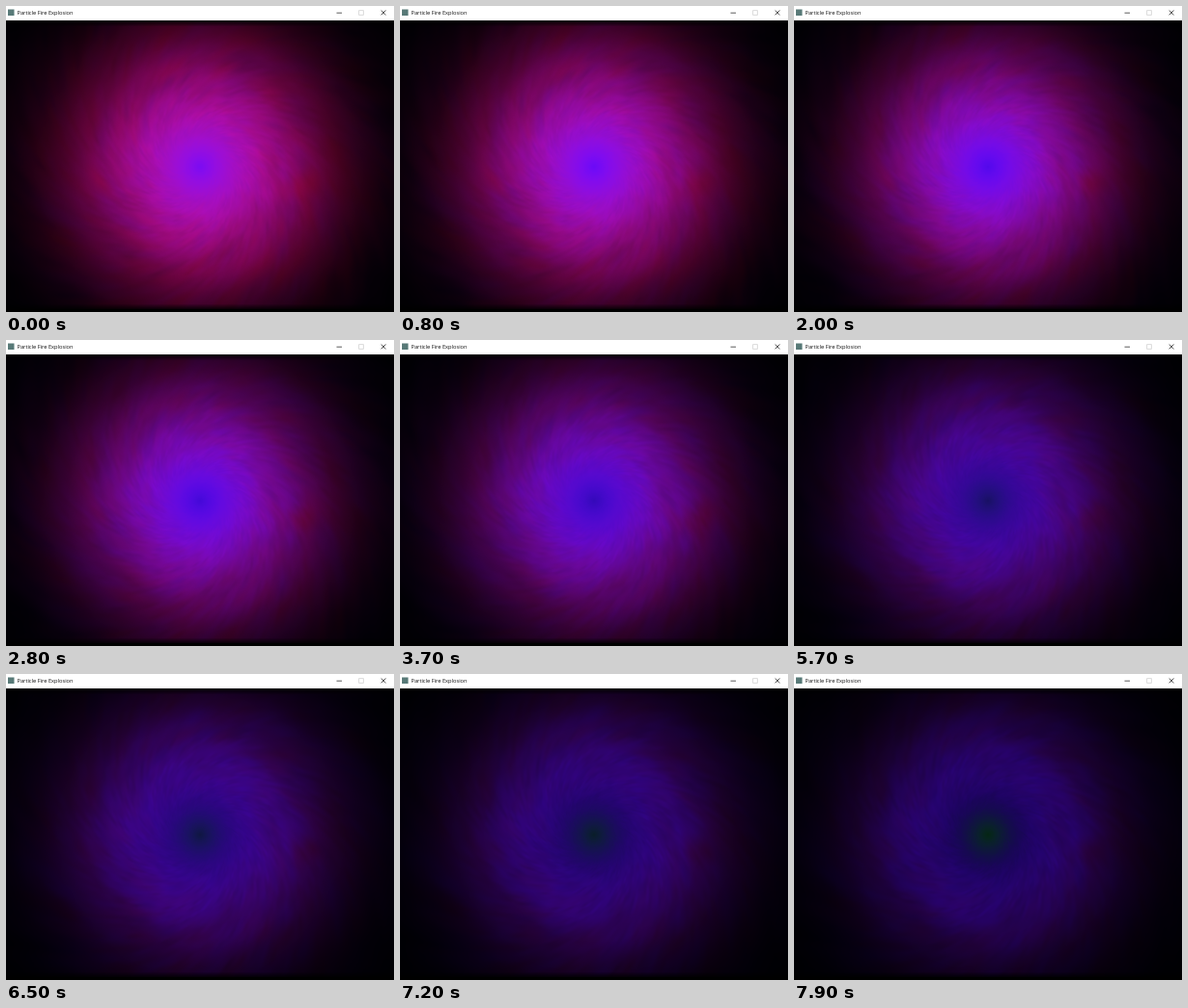
Recreate the animation shown at these times as an HTML page with a canvas. Size 402 by 318 pixels, loop 8 s.

```html
<!DOCTYPE html>
<html lang="en">
<head>
<meta charset="utf-8">
<title>Particle Fire Explosion</title>
<style>
  html, body { margin: 0; width: 100%; height: 100%; overflow: hidden; background: #000; }
  svg, canvas { position: absolute; left: 0; display: block; }
  svg { top: 0; background: #fff; }
  canvas { top: 15px; }
  text { font: 5.7px "Open Sans", "Noto Sans", sans-serif; fill: #111; }
</style>
</head>
<body>
<svg width="402" height="15" viewBox="0 0 402 15">
  <rect x="2" y="3.5" width="6.5" height="6.5" fill="#587a78"/>
  <text x="11.5" y="9.2">Particle Fire Explosion</text>
  <g fill="none" stroke-width=".8">
    <path d="M342.5 7.2h5.5" stroke="#333"/>
    <rect x="365.7" y="4.7" width="4.6" height="4.6" stroke="#d0d0d0"/>
    <path d="M388.7 4.5l4.8 4.8m0-4.8l-4.8 4.8" stroke="#222"/>
  </g>
</svg>
<canvas id="fire" width="402" height="300"></canvas>
<script>
const W = 402, H = 300, CX = 201, CY = 152;
const LOOP = 8000, STEP = 100, TWIST = 1.05, REACH = 300;
const ctx = document.getElementById('fire').getContext('2d');
const image = ctx.createImageData(W, H);
const pixels = image.data;

const lerp = (a, b, k) => a + (b - a) * k;
const clamp = (x, lo, hi) => Math.min(hi, Math.max(lo, x));
const wave = angle => .5 + .5 * Math.cos(angle);
const bell = (x, width, power = 2) => Math.exp(-((x / width) ** power));
const delay = (r, most, scale) => most * (1 - Math.exp(-r / scale));

// Seeded value noise around zero, periodic in both directions.
const SIZE = 128, lattice = new Float32Array(SIZE * SIZE);
let seed = 4711;
for (let i = 0; i < lattice.length; i++) {
  seed = (Math.imul(seed, 1664525) + 1013904223) >>> 0;
  lattice[i] = seed / 4294967296 - .5;
}
function noise(u, v, period) {
  const iu = Math.floor(u), iv = Math.floor(v);
  let fu = u - iu, fv = v - iv;
  fu *= fu * (3 - 2 * fu);
  fv *= fv * (3 - 2 * fv);
  const a = iu & (period - 1), b = (iu + 1) & (period - 1);
  const p = (iv & 127) * SIZE, q = ((iv + 1) & 127) * SIZE;
  return lerp(lerp(lattice[p + a], lattice[p + b], fu),
              lerp(lattice[q + a], lattice[q + b], fu), fv);
}

// Per-pixel spiral coordinates and the parts that stand still.
const N = W * H;
const [radius, turn, depth, still, rough, redness, border] =
  Array.from({ length: 7 }, () => new Float32Array(N));
for (let y = 0, i = 0; y < H; y++) {
  for (let x = 0; x < W; x++, i++) {
    const dx = x + .5 - CX, dy = y + .5 - CY, r = Math.hypot(dx, dy);
    radius[i] = r;
    depth[i] = Math.log(r + 8);
    turn[i] = (Math.atan2(dy, dx) - TWIST * depth[i]) / (2 * Math.PI);
    still[i] = noise(turn[i] * 16, depth[i] * 5 + 20, 16);
    rough[i] = clamp((r - 25) / 150, 0, 1);
    redness[i] = .3 * bell(Math.hypot(x - 312, y - 168), 15)
               + .4 * noise(turn[i] * 32, depth[i] * 7 + 70, 32) * rough[i];
    border[i] = clamp((Math.min(y, H - y) + 1) / 7, 0, 1);
  }
}

// Each channel swings at the centre; the swing arrives later and weaker further out.
function buildProfile(s) {
  const out = new Float32Array(REACH * 3);
  for (let r = 0; r < REACH; r++) {
    const rim = bell(r, 215, 6);
    const red = wave(1.6 + .16 * (s - delay(r, 7.5, 85))) * bell(r, 134 - 1.8 * s) * rim;
    const pulse = wave(.36 * (s - delay(r, 3, 70)) - .3);
    const blue = lerp(pulse, 1, Math.min(.6, r / 150)) * bell(r, 108, 1.8);
    out[r * 3] = 255 * red;
    out[r * 3 + 1] = 24 * red * bell(r, 120) + 38 * bell(r, 22) * (s / 8) ** 3;
    out[r * 3 + 2] = 246 * blue;
  }
  return out;
}

function draw(t) {
  const s = t / 1000, profile = buildProfile(s);
  const spin = s * .006, flow = s * .45;
  for (let i = 0, o = 0; i < N; i++, o += 4) {
    const u = turn[i] - spin, d = depth[i], m = rough[i];
    const wide = noise(u * 64, d * 8 - flow, 64);
    const fine = noise(u * 128, d * 13 - flow * 1.6 + 50, 128);
    const r = radius[i] * (1 + .09 * wide + .07 * fine + .08 * still[i] * m);
    const at = Math.min(REACH - 1, r | 0) * 3;
    const light = border[i] * (1 + m * (.35 * still[i] + .3 * wide + .3 * fine));
    const tint = redness[i] + m * .15 * (wide - fine);
    pixels[o] = profile[at] * light * (1 + .3 * tint);
    pixels[o + 1] = profile[at + 1] * light;
    pixels[o + 2] = profile[at + 2] * light * (1 - tint);
    pixels[o + 3] = 255;
  }
  ctx.putImageData(image, 0, 0);
}

let shown = -1;
function tick() {
  const t = Math.floor(performance.now() % LOOP / STEP) * STEP;
  if (t !== shown) draw(shown = t);
  requestAnimationFrame(tick);
}
tick();
</script>
</body>
</html>
```
